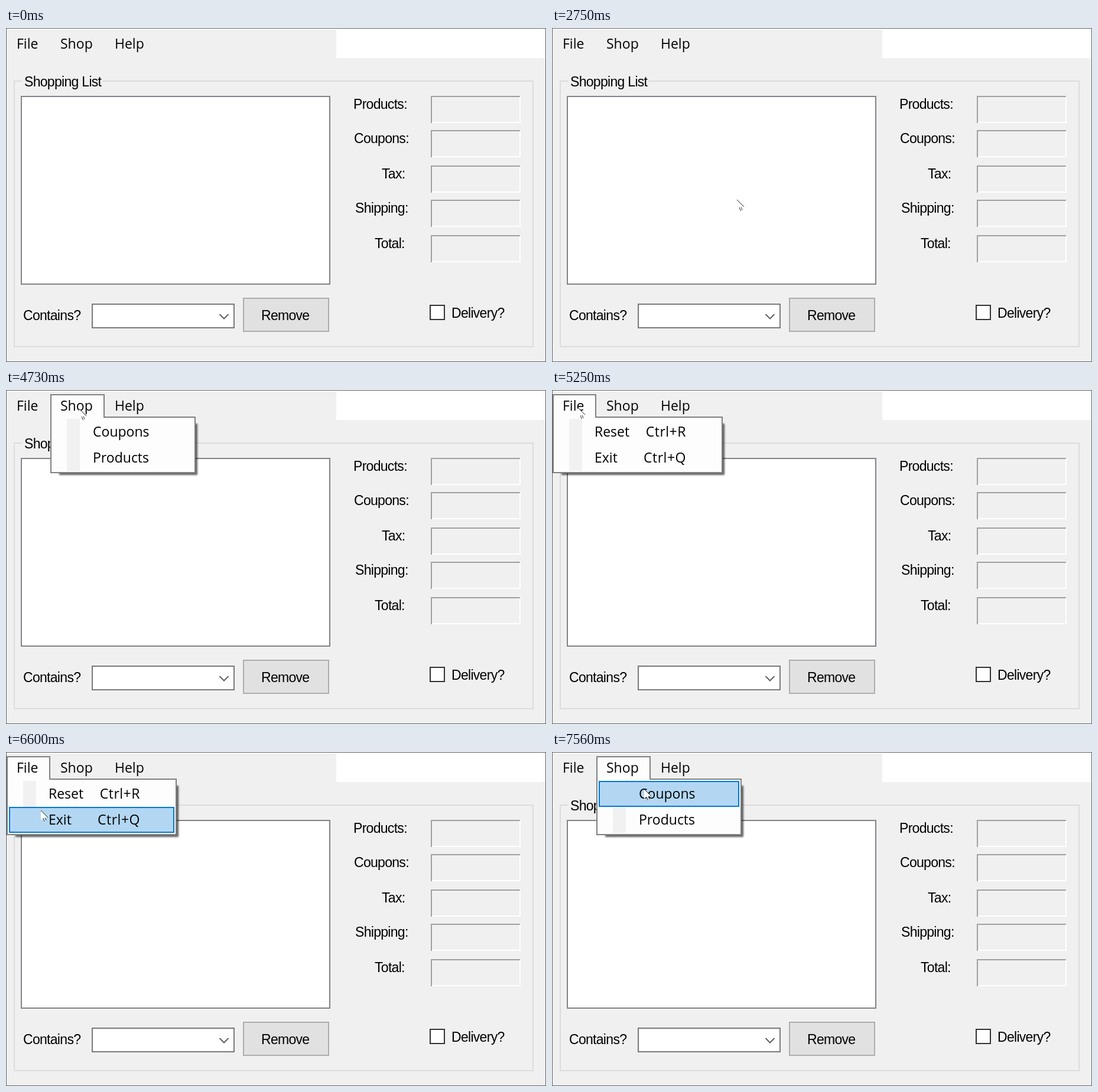
Animation of 914x566 px, one loop 8000 ms. Source, as an HTML page:

```html
<!DOCTYPE html>
<html lang="en">
<head>
<meta charset="utf-8">
<title>Shopping list form</title>
<style>
  html, body { margin: 0; width: 100%; height: 100%; overflow: hidden; background: #f0f0f0; }
  svg { display: block; }
  text { fill: #000; }
  .menu { font: 23px "Open Sans", "Noto Sans", sans-serif; }
  .form { font: 23px "Liberation Sans", Arial, sans-serif; letter-spacing: -.7px; }
  .hot { fill: #b3d7f3; stroke: #0078d7; stroke-width: 2; }
  .line { stroke-width: 2; }
</style>
</head>
<body>
<svg id="stage" width="914" height="566" viewBox="0 0 914 566">
  <defs>
    <filter id="soft" x="-10%" y="-20%" width="120%" height="140%"><feGaussianBlur stdDeviation="1.6"/></filter>
  </defs>
  <rect width="914" height="566" fill="#f0f0f0"/>
  <rect x="1" y="1" width="912" height="2" fill="#fff"/>
  <rect x="559" y="1" width="354" height="50" fill="#fff"/>
  <rect x=".5" y=".5" width="913" height="565" fill="none" stroke="#636363"/>

  <g class="line">
    <path d="M27 90H14V540H892V90H163" fill="none" stroke="#dcdcdc"/>
    <rect x="26" y="116" width="522" height="318" fill="#fff" stroke="#828288"/>
    <rect x="146" y="468" width="240" height="40" fill="#fff" stroke="#7a7a7a"/>
    <path d="M361.5 485L369 492.500L376.500 485" fill="none" stroke="#606060"/>
    <rect x="402" y="458" width="144" height="56" fill="#e1e1e1" stroke="#adadad"/>
    <rect x="718" y="470" width="24" height="24" fill="#fff" stroke="#333"/>
  </g>
  <g class="form">
    <text x="31" y="99">Shopping List</text>
    <text x="29" y="495">Contains?</text>
    <text x="432" y="495">Remove</text>
    <text x="754" y="491">Delivery?</text>
  </g>
  <g id="totals" class="form line"></g>

  <rect id="fileHot" class="hot" x="2" y="8" width="72" height="38"/>
  <rect id="shopHot" class="hot" x="76" y="8" width="90" height="38"/>
  <g id="menus" class="menu"></g>
  <g class="menu">
    <text x="18" y="35">File</text>
    <text x="92" y="35">Shop</text>
    <text x="184" y="35">Help</text>
  </g>

  <g id="cursor">
    <path d="M0 0V16.500L3.800 13L6.500 19.500L9.500 18.300L7 12H12Z" fill="#fff"/>
    <path d="M0 0L12 12M4 13L6.500 19M7 12.500L9 17.500" fill="none" stroke="#222"/>
  </g>
</svg>
<script>
const LOOP = 8000;
const $ = id => document.getElementById(id);

// Output fields: label, label x, top edge
$('totals').innerHTML = [
  ['Products:', 588, 115], ['Coupons:', 589, 173], ['Tax:', 636, 233],
  ['Shipping:', 591, 291], ['Total:', 624, 351]
].map(([label, x, y]) => `
  <text x="${x}" y="${y + 22}">${label}</text>
  <path d="M719 ${y + 45}H870V${y}" fill="none" stroke="#fff"/>
  <path d="M720 ${y + 46}V${y + 1}H870" fill="none" stroke="#a0a0a0"/>`).join('');

// Drop-down joined to its title tab
function menu(id, left, tab, right, textX, items) {
  const rows = items.map(([name, key], i) => `
    <rect id="${name.toLowerCase()}" class="hot" x="${left + 5}" y="${50 + 44 * i}" width="${right - left - 10}" height="42"/>
    <text x="${textX}" y="${79 + 44 * i}">${name}</text>
    ${key ? `<text x="227" y="${79 + 44 * i}" text-anchor="end" letter-spacing=".5">${key}</text>` : ''}`);
  return `<g id="${id}">
    <rect x="${left + 15}" y="57" width="${right - left - 12}" height="87" opacity=".62" filter="url(#soft)"/>
    <path class="line" d="M${left + 1} 140V8H${tab - 1}V46H${right - 1}V140Z" fill="#fdfdfd" stroke="#808080"/>
    <rect x="${left + 28}" y="49" width="22" height="88" fill="#f1f1f1"/>
    ${rows.join('')}</g>`;
}
$('menus').innerHTML =
  menu('fileMenu', 1, 75, 289, 72, [['Reset', 'Ctrl+R'], ['Exit', 'Ctrl+Q']]) +
  menu('shopMenu', 75, 167, 321, 147, [['Coupons'], ['Products']]);

// time, pointer x, pointer y, visible layers
const steps = [
  [0, 467, 508, ''],
  [500, 467, 508, 'cursor'],
  [640, 322, 335, 'cursor'],
  [780, 150, 132, 'cursor'],
  [920, 51, 33, 'cursor fileHot'],
  [1320, 60, 35, 'cursor fileHot'],
  [1450, 73, 37, 'cursor fileHot'],
  [1590, 71, 38, 'cursor fileHot'],
  [1870, 71, 37, 'cursor fileHot'],
  [2150, 84, 52, 'cursor'],
  [2270, 124, 98, 'cursor'],
  [2390, 184, 166, 'cursor'],
  [2510, 244, 231, 'cursor'],
  [2630, 289, 275, 'cursor'],
  [2750, 313, 291, 'cursor'],
  [2870, 362, 273, 'cursor'],
  [3020, 446, 216, 'cursor'],
  [3170, 521, 146, 'cursor'],
  [3290, 571, 92, 'cursor'],
  [3425, 456, 70, 'cursor'],
  [3560, 298, 48, 'cursor'],
  [3695, 176, 35, 'cursor'],
  [3830, 141, 31, 'cursor shopHot'],
  [4140, 141, 31, 'cursor shopMenu'],
  [4730, 124, 32, 'cursor shopMenu'],
  [4900, 92, 32, 'cursor shopMenu'],
  [5080, 60, 31, 'cursor fileMenu'],
  [5250, 44, 30, 'cursor fileMenu'],
  [5530, 44, 30, 'cursor fileHot'],
  [5700, 43, 31, 'cursor fileHot'],
  [5860, 42, 31, 'cursor fileHot'],
  [6030, 41, 32, 'cursor fileMenu'],
  [6200, 41, 32, 'cursor fileMenu'],
  [6450, 50, 62, 'cursor fileMenu reset'],
  [6600, 59, 99, 'cursor fileMenu exit'],
  [6750, 62, 94, 'cursor fileMenu exit'],
  [6885, 68, 64, 'cursor fileMenu reset'],
  [7020, 86, 36, 'cursor shopMenu'],
  [7155, 112, 29, 'cursor shopMenu'],
  [7290, 134, 35, 'cursor shopMenu'],
  [7425, 149, 52, 'cursor shopMenu coupons'],
  [7560, 156, 63, 'cursor shopMenu coupons']
];

function play(el, pose) {
  const frames = steps.map(s => ({ offset: s[0] / LOOP, easing: 'steps(1, end)', ...pose(s) }));
  frames.push({ ...frames[frames.length - 1], offset: 1 });
  el.animate(frames, { duration: LOOP, iterations: Infinity });
}

play($('cursor'), ([, x, y]) => ({ transform: `translate(${x}px, ${y}px)` }));
for (const id of ['cursor', 'fileHot', 'shopHot', 'fileMenu', 'shopMenu', 'reset', 'exit', 'coupons', 'products'])
  play($(id), s => ({ opacity: s[3].split(' ').includes(id) ? 1 : 0 }));
</script>
</body>
</html>
```
